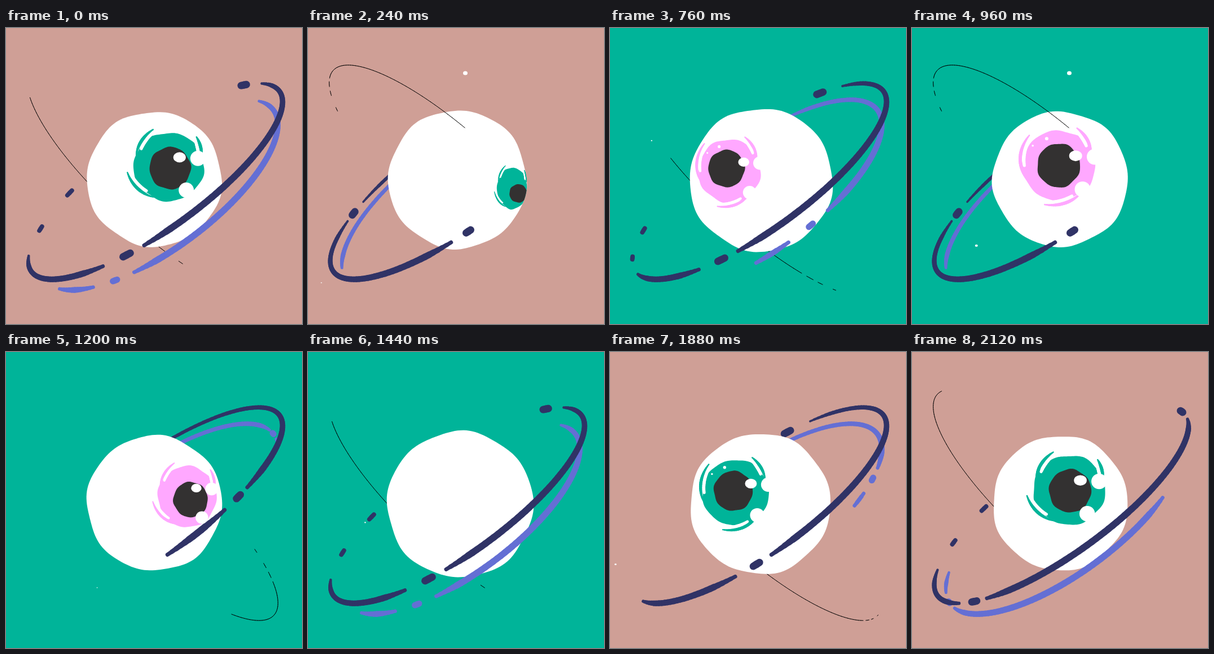
Recreate the animation shown at these times as an HTML page with a canvas. Size 525 px wide and 525 px high, loop 2.16 s.

```html
<!DOCTYPE html>
<html lang="en">
<head>
<meta charset="utf-8">
<title>Orbiting eye</title>
<style>
html, body { margin: 0; width: 100%; height: 100%; overflow: hidden; }
canvas { display: block; width: 100vmin; height: 100vmin; }
</style>
</head>
<body>
<canvas id="stage" width="525" height="525"></canvas>
<script>
const g = document.getElementById('stage').getContext('2d');
const TEAL = '#00b499', ROSE = '#cf9f96', PINK = '#ffa8ff', INK = '#333131';
const FRAMES = 54, STEP = 40, EYE_TURN = 27, LAP = 9, SWAP = 12;
const RAD = Math.PI / 180;

const lerp = (a, b, q) => a + (b - a) * q;
// A value that swings once per lap around its mean.
const sway = ([mean, swing, from], p) => mean + swing * Math.sin(2 * Math.PI * (p - from) / LAP);

// Tilted ellipses; angles 0 to 180 pass in front of the ball. The head runs
// 40 degrees per frame plus a sway, and the trail length sways too.
const line = {
  color: '#000', x: 260, y: 271, a: 291, b: 83, tilt: 42.3,
  head: [-52, 28, 4], length: [98, 18, 4], width: 1, depth: 0,
  dashes: () => [[0, .78], [.81, .85], [.88, .91], [.98, 1]]
};
const blue = {
  color: '#646fd4', x: 271, y: 296, a: 253, b: 95, tilt: 143.5,
  head: [-208, 52, 7.5], length: [120, 60, 7], width: 9, depth: 2.5, dot: 11,
  dashes: gap => [[.42 * gap + .06, 1], [.42 * gap], [0, .42 * gap - .06]]
};
const dark = {
  color: '#303366', x: 265, y: 272, a: 272, b: 84, tilt: 144,
  head: [-170, 38, 5.5], length: [212, 65, 7], width: 8.8, depth: 3.2, dot: 13,
  dashes: gap => [[gap + .035, .95], [.99], [gap],
    ...(gap > .3 ? [[.16, gap - .035], [.08, .09], [0, .01]] : [[0, gap - .035]])]
};
const ORBITS = [line, blue, dark];

// Loose strands around the iris: angle on the rim, angle at the tip.
const STRANDS = {
  coming: [[160, 227], [335, 295], [50, 109]],
  going: [[200, 248], [115, 172], [342, 312]]
};

let seed = 11;
const random = () => (seed = seed * 16807 % 2147483647) / 2147483647;
const stars = Array.from({ length: 14 }, (_, i) => ({
  x: 525 * random(), y: 525 * random(), r: 1.5 + 2 * random(), born: 2 + 3.4 * i
}));

function segment(a, b, width) {
  g.lineWidth = width;
  g.beginPath();
  g.moveTo(...a);
  g.lineTo(...b);
  g.stroke();
}

function ellipse(x, y, rx, ry) {
  g.beginPath();
  g.ellipse(x, y, rx, ry, 0, 0, 7);
  g.fill();
}

// A hand-cut ellipse with a slightly uneven edge.
function blobPath(x, y, rx, ry, rough, phase) {
  g.beginPath();
  for (let a = 0; a < 6.28; a += .04) {
    const r = 1 + rough * (Math.sin(5 * a + phase) + Math.sin(8 * a - 2 * phase));
    g.lineTo(x + rx * r * Math.cos(a), y + ry * r * Math.sin(a));
  }
  g.closePath();
}

function orbitPoint({ x, y, a, b, tilt }, angle) {
  const u = a * Math.cos(angle * RAD), v = b * Math.sin(angle * RAD);
  const c = Math.cos(tilt * RAD), s = Math.sin(tilt * RAD);
  return [x + u * c + v * s, y + u * s - v * c];
}

function drawOrbit(orbit, frame, front) {
  const p = (frame + 4) % LAP + 5;
  const head = sway(orbit.head, p) + 40 * p, length = sway(orbit.length, p);
  // The break in the trail opens after the fifth step and closes again.
  const age = p - 5, gap = .45 * Math.min(Math.sqrt(age / 4), (9 - age) / 5);
  g.strokeStyle = orbit.color;
  g.lineCap = 'round';
  for (const [from, to = from + .012] of orbit.dashes(gap)) {
    const start = head - length * (1 - from), end = head - length * (1 - to);
    const count = Math.ceil((end - start) / 2);
    for (let k = 0; k < count; k++) {
      const a = lerp(start, end, k / count), b = lerp(start, end, (k + 1) / count);
      const mid = (a + b) / 2, near = Math.sin(mid * RAD);
      if (near > 0 !== front) continue;
      const taper = orbit.dot ? Math.min(1, .55 + Math.min(mid - start, end - mid) / 24) : 1;
      const isDot = to - from < .013;
      const width = isDot ? (from < .1 && gap > .3 ? orbit.dot * .6 : orbit.dot)
        : (orbit.width + orbit.depth * near) * taper;
      segment(orbitPoint(orbit, a), orbitPoint(orbit, b), width);
    }
  }
}

function ballAt(u) {
  const swell = ((1 - Math.cos(2 * Math.PI * u / EYE_TURN)) / 2) ** 2;
  return { x: 263 + 12 * swell, y: 268 + 4 * swell, r: 119.5 + 17.5 * swell };
}

function drawIris(ball, u, color) {
  // Longitude on the ball: slow while facing the viewer, faster at the edges.
  const turn = (u < SWAP ? u + EYE_TURN : u) - 24.2;
  const lon = .075 * turn + .00035 * turn ** 3;
  const squash = Math.cos(1.27 * lon);
  if (squash <= 0) return;
  const x = ball.x - 1 + (ball.r + 3) * Math.sin(lon), y = 244 + 50 * lon * lon;
  const rx = 65 * squash, ry = 62 * squash ** .6;
  const coming = turn < 1;
  const place = (a, b) => [x + a * rx, y + b * ry];

  g.fillStyle = color;
  blobPath(x, y, rx, ry, .015, u);
  g.fill();

  if (squash > .3) for (const [rim, tip] of STRANDS[coming ? 'coming' : 'going']) {
    const spiral = (q, inset) => {
      const a = lerp(rim, tip, q) * RAD, r = .98 + .2 * q - inset;
      return place(r * Math.cos(a), r * Math.sin(a));
    };
    for (const [shade, inset, from] of [['#fff', .1, .3], [color, 0, 0]]) {
      g.strokeStyle = shade;
      for (let q = from; q < .99; q += .05)
        segment(spiral(q, inset), spiral(q + .05, inset), (2 + 4 * Math.sin(Math.PI * q)) * squash);
    }
  }

  if (squash < .3) return;
  g.fillStyle = INK;
  blobPath(x + 12 * lon, y + 10 * lon, 38 * squash, 39 * squash, .015, u + 2);
  g.fill();

  if (squash < .5) return;
  const shine = (a, b, w, h) => ellipse(...place(a + (coming ? .15 : 0), b), w * squash, h * squash);
  g.fillStyle = '#fff';
  shine(.83, -.25, 14, 14);
  shine(.5, .68, 14, 14);
  shine(.31, -.28, 11.5, 9.5);
  if (coming) {
    shine(-.48, -.77, 3, 3);
    shine(-.86, -.57, 1.8, 1.8);
  }
}

function draw(frame) {
  const u = frame % EYE_TURN, ball = ballAt(u);
  const swapped = frame >= SWAP && frame < SWAP + EYE_TURN;
  g.fillStyle = swapped ? TEAL : ROSE;
  g.fillRect(0, 0, 525, 525);

  for (const orbit of ORBITS) drawOrbit(orbit, frame, false);
  g.save();
  blobPath(ball.x, ball.y, ball.r, ball.r, .009, u);
  g.fillStyle = '#fff';
  g.fill();
  g.clip();
  drawIris(ball, u, swapped ? PINK : TEAL);
  g.restore();
  for (const orbit of ORBITS) drawOrbit(orbit, frame, true);

  g.fillStyle = '#fff';
  if (frame % 18 === 6) ellipse(279, 80, 4, 3.5);
  for (const { x, y, r, born } of stars) {
    const life = (frame - born) / 4;
    if (life > 0 && life < 1) ellipse(x, y, r * Math.sin(Math.PI * life), r * .8 * Math.sin(Math.PI * life));
  }
}

function tick() {
  draw(Math.floor(performance.now() / STEP) % FRAMES);
  requestAnimationFrame(tick);
}
tick();
</script>
</body>
</html>
```
